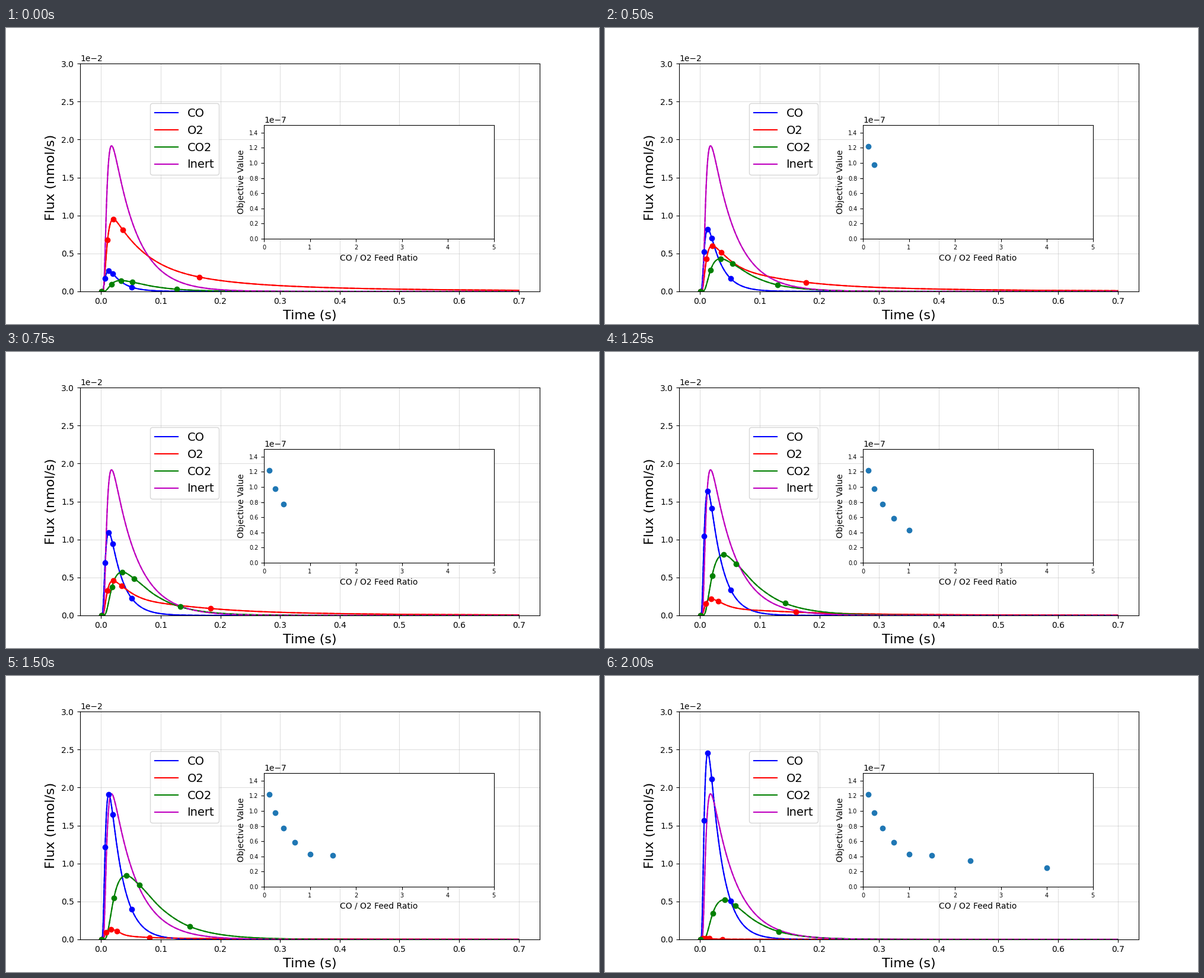
A matplotlib script that plays this animation: 1000 by 500 pixels, repeating every 3 s.

```python
import numpy as np
import matplotlib.pyplot as plt
from matplotlib.animation import FuncAnimation

plt.rcParams["font.family"] = "DejaVu Sans"

STEPS = 9            # feed mixtures, the last one is held
FRAMES = 12
INTERVAL = 250
T = np.linspace(0, 0.7, 1401)
COLORS = {"CO": "b", "O2": "r", "CO2": "g", "Inert": "m"}
OBJECTIVE = np.array([1.219, 0.977, 0.775, 0.588, 0.432, 0.416, 0.346, 0.253]) * 1e-7


def diffusion(tau):
    """Exit flux of a pulse diffusing through a packed bed."""
    tau = np.maximum(tau, 1e-3)
    n = np.arange(25)[:, None]
    terms = (-1.0) ** n * (2 * n + 1) * np.exp(-(2 * n + 1) ** 2 / (4 * tau))
    return np.maximum(terms.sum(axis=0) * tau ** -1.5, 0)


def unit(y):
    return y / y.max()


def smooth(x, xs, ys):
    """Cubic Hermite curve, flat at the first knot, straight past the last."""
    m = np.gradient(ys, xs)
    m[0] = 0
    i = np.clip(np.searchsorted(xs, x) - 1, 0, len(xs) - 2)
    h = xs[i + 1] - xs[i]
    s = np.clip((x - xs[i]) / h, 0, 1)
    y = ((1 + 2 * s) * (1 - s) ** 2 * ys[i] + s * (1 - s) ** 2 * h * m[i]
         + s ** 2 * (3 - 2 * s) * ys[i + 1] - s ** 2 * (1 - s) * h * m[i + 1])
    return y + np.maximum(x - xs[-1], 0) * m[-1]


def rise(u):
    u = np.maximum(u, 1e-2)
    return u ** -1.5 * np.exp(-1.5 * (1 / u - 1))


# Times of the peak and of the fall to 85 % and 20 %, for a CO share x
def o2_times(x):
    top = 20.7 - 16.8 * x ** 4
    high = 36.7 - 29.5 * x ** 3
    low = 36 + (122 + 64 * x) / (1 + (x / 0.654) ** 14.4)
    return np.array([top, high, low]) / 1000


def co2_times(x):
    base = np.array([33.6, 52.6, 127])
    gain = np.array([21.5, 29.5, 56])
    drop = np.array([46, 86, 208])
    return (base + gain * x ** 2.5 - drop * x ** 16) / 1000


def o2_curve(x):
    top, high, low = o2_times(x)
    knots = np.log([top, high, np.sqrt(high * low), low, np.sqrt(low * 0.7), 0.7])
    levels = np.log([1, 0.85, 0.52 - 0.22 * x, 0.2, 0.065, 0.016])
    fall = np.exp(smooth(np.log(np.maximum(T, top)), knots, levels))
    peak = 0.0095 * ((1 - x) / 0.9) ** 1.81
    return peak * np.where(T < top, rise(T / top) ** 0.9, fall)


def co2_curve(x):
    top, high, low = co2_times(x)
    knots = np.array([top, high, (high + low) / 2, low, 2 * low - high])
    levels = np.log([1, 0.85, 0.44, 0.2, 0.041])
    fall = np.exp(smooth(np.maximum(T, top), knots, levels))
    peak = 0.0144 * x * (1 - 1.02 * x ** 5.1)
    return peak * np.where(T < top, rise(T / top), fall)


CO_UNIT = unit(diffusion(10.5 * (T + 0.0004)) * np.exp(-20.5 * T))
CO_TIMES = [0.001, 0.0069, T[CO_UNIT.argmax()], 0.0196, 0.0514]
INERT = 0.01917 * unit(diffusion(10.1 * (T - 0.0012)))


def curves(x):
    return {"CO": 0.02728 * x * CO_UNIT, "O2": o2_curve(x),
            "CO2": co2_curve(x), "Inert": INERT}


def sample_times(x):
    o2, co2 = o2_times(x), co2_times(x)
    return {"CO": CO_TIMES, "O2": [0.001, 0.53 * o2[0], *o2],
            "CO2": [0.001, 0.51 * co2[0], *co2]}


fig = plt.figure(figsize=(10, 5), dpi=100)
ax = fig.add_axes([0.125, 0.11, 0.775, 0.77])
ax.set_xlim(-0.035, 0.735)
ax.set_ylim(0, 0.03)
ax.set_xlabel("Time (s)", fontsize=16, labelpad=5)
ax.set_ylabel("Flux (nmol/s)", fontsize=16, labelpad=5)
ax.ticklabel_format(axis="y", style="sci", scilimits=(0, 0))
ax.grid(alpha=0.4)

solid = {n: ax.plot([], [], c, label=n)[0] for n, c in COLORS.items()}
dashed = {n: ax.plot([], [], c + "--")[0] for n, c in COLORS.items()}
dots = {n: ax.plot([], [], COLORS[n] + "o")[0] for n in ("CO", "O2", "CO2")}
ax.legend(loc="upper left", bbox_to_anchor=(0.14, 0.85), fontsize=14)

inset = fig.add_axes([0.435, 0.288, 0.3875, 0.384])
inset.set_xlim(0, 5)
inset.set_ylim(0, 1.5e-7)
inset.tick_params(labelsize=7)
inset.set_xlabel("CO / O2 Feed Ratio", fontsize=10)
inset.set_ylabel("Objective Value", fontsize=10)
score, = inset.plot([], [], "o", color="C0")


def update(frame):
    k = min(frame, STEPS - 1)
    x = (k + 1) / 10
    flux = curves(x)
    for name, y in flux.items():
        solid[name].set_data(T, y)
        dashed[name].set_data(T, y)
    for name, ts in sample_times(x).items():
        dots[name].set_data(ts, np.interp(ts, T, flux[name]))
    share = np.arange(1, k + 1) / 10
    score.set_data(share / (1 - share), OBJECTIVE[:k])
    return [*solid.values(), *dashed.values(), *dots.values(), score]


anim = FuncAnimation(fig, update, frames=FRAMES, interval=INTERVAL,
                     repeat=True, repeat_delay=0, blit=False)
plt.show()
```
